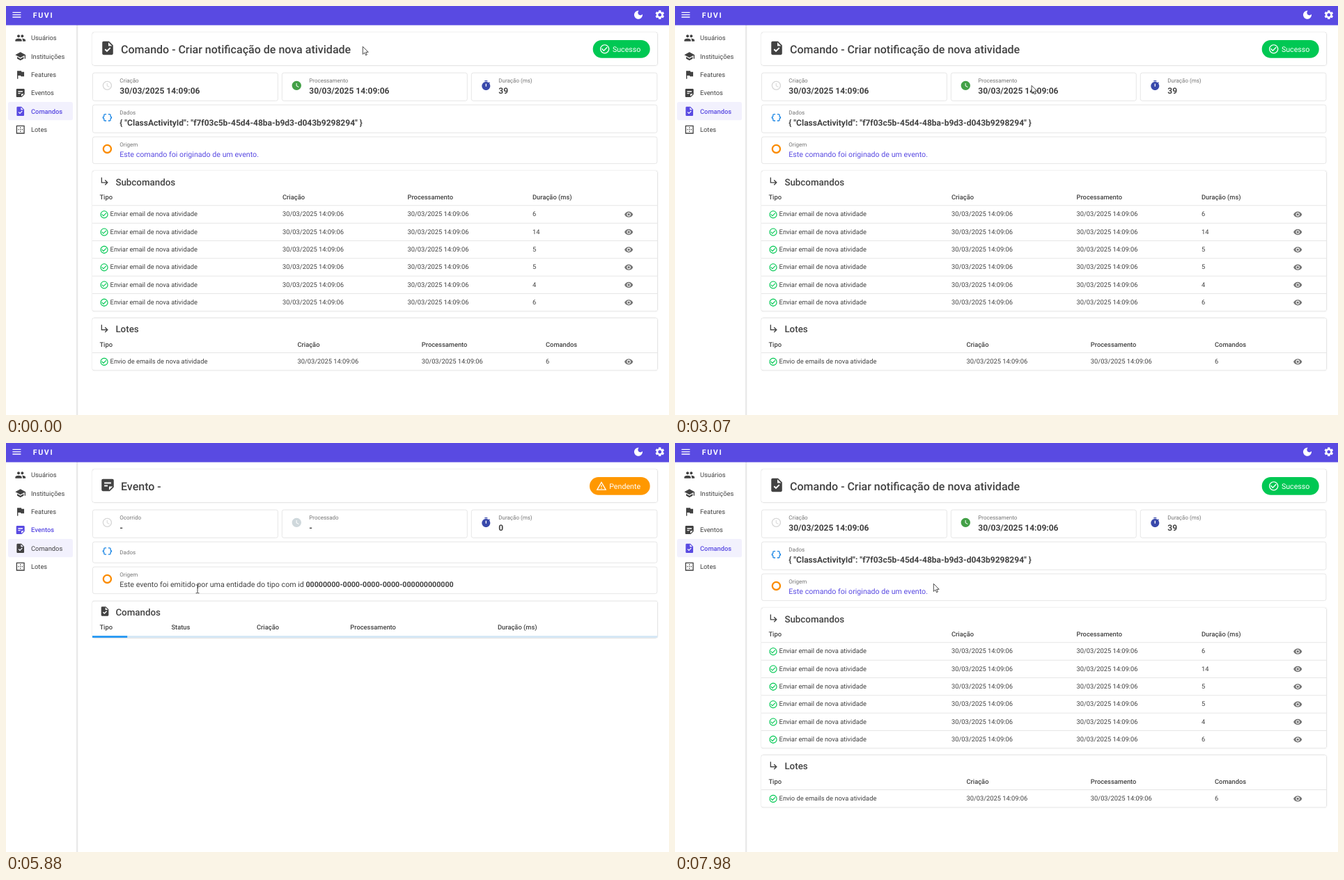
An HTML page that plays this animation: 952 by 588 pixels, repeating every 8000 ms.

```html
<!DOCTYPE html>
<html lang="pt-BR">
<head>
<meta charset="utf-8">
<title>Painel de comandos</title>
<style>
html, body { margin: 0; width: 100%; height: 100%; overflow: hidden; background: #fff; }
svg { display: block; width: 952px; height: 588px; font-family: Roboto, sans-serif; text-rendering: geometricPrecision; }
text { white-space: pre; }
.paper { fill: #fff; filter: drop-shadow(0 .8px .6px rgba(0,0,0,.3)) drop-shadow(0 0 .8px rgba(0,0,0,.14)); }
.card { fill: #fff; stroke: #e0e0e0; stroke-width: .8; }
</style>
</head>
<body>
<svg id="stage" viewBox="0 0 952 588" xmlns="http://www.w3.org/2000/svg"></svg>
<script>
const LOOP = 8000, INK = '#424242', PRIMARY = '#594ae2', GREEN = '#00c853', AMBER = '#ff9800';

const ICONS = {
  menu: 'M3 18h18v-2H3v2zm0-5h18v-2H3v2zm0-7v2h18V6H3z',
  moon: 'M12 3c-4.97 0-9 4.03-9 9s4.03 9 9 9 9-4.03 9-9c0-.46-.04-.92-.1-1.36-.98 1.37-2.58 2.26-4.4 2.26-2.98 0-5.4-2.42-5.4-5.4 0-1.81.89-3.42 2.26-4.4-.44-.06-.9-.1-1.36-.1z',
  gear: 'M19.14 12.94c.04-.3.06-.61.06-.94 0-.32-.02-.64-.07-.94l2.03-1.58c.18-.14.23-.41.12-.61l-1.92-3.32c-.12-.22-.37-.29-.59-.22l-2.39.96c-.5-.38-1.03-.7-1.62-.94l-.36-2.54c-.04-.24-.24-.41-.48-.41h-3.84c-.24 0-.43.17-.47.41l-.36 2.54c-.59.24-1.13.57-1.62.94l-2.39-.96c-.22-.08-.47 0-.59.22L2.74 8.87c-.12.21-.08.47.12.61l2.03 1.58c-.05.3-.09.63-.09.94s.02.64.07.94l-2.03 1.58c-.18.14-.23.41-.12.61l1.92 3.32c.12.22.37.29.59.22l2.39-.96c.5.38 1.03.7 1.62.94l.36 2.54c.05.24.24.41.48.41h3.84c.24 0 .44-.17.47-.41l.36-2.54c.59-.24 1.13-.56 1.62-.94l2.39.96c.22.08.47 0 .59-.22l1.92-3.32c.12-.22.07-.47-.12-.61l-2.01-1.58zM12 15.6c-1.98 0-3.6-1.62-3.6-3.6s1.62-3.6 3.6-3.6 3.6 1.62 3.6 3.6-1.62 3.6-3.6 3.6z',
  people: 'M16 11c1.66 0 2.99-1.34 2.99-3S17.66 5 16 5c-1.66 0-3 1.34-3 3s1.34 3 3 3zm-8 0c1.66 0 2.99-1.34 2.99-3S9.66 5 8 5C6.34 5 5 6.34 5 8s1.34 3 3 3zm0 2c-2.33 0-7 1.17-7 3.5V19h14v-2.5c0-2.33-4.67-3.5-7-3.5zm8 0c-.29 0-.62.02-.97.05 1.16.84 1.97 1.97 1.97 3.45V19h6v-2.5c0-2.33-4.67-3.5-7-3.5z',
  school: 'M5 13.18v4L12 21l7-3.82v-4L12 17l-7-3.82zM12 3 1 9l11 6 9-4.91V17h2V9L12 3z',
  flag: 'M14.4 6 14 4H5v17h2v-7h5.6l.4 2h7V6z',
  note: 'M19 3H4.99C3.89 3 3 3.9 3 5l.01 14c0 1.1.89 2 1.99 2h10l6-6V5c0-1.1-.9-2-2-2zM7 8h10v2H7V8zm5 6H7v-2h5v2zm2 5.5V14h5.5L14 19.5z',
  task: 'M14 2H6c-1.1 0-1.99.9-1.99 2L4 20c0 1.1.89 2 1.99 2H18c1.1 0 2-.9 2-2V8l-6-6zm-3.06 16L7.4 14.46l1.41-1.41 2.12 2.12 4.24-4.24 1.41 1.41L10.94 18zM13 9V3.5L18.5 9H13z',
  batch: 'M13 7h-2v2h2V7zm0 4h-2v2h2v-2zm4 0h-2v2h2v-2zM3 3v18h18V3H3zm16 16H5V5h14v14zm-6-4h-2v2h2v-2zm-4-4H7v2h2v-2z',
  clock: 'M11.99 2C6.47 2 2 6.48 2 12s4.47 10 9.99 10C17.52 22 22 17.52 22 12S17.52 2 11.99 2zM12 20c-4.42 0-8-3.58-8-8s3.58-8 8-8 8 3.58 8 8-3.58 8-8 8zm.5-13H11v6l5.25 3.15.75-1.23-4.5-2.67z',
  clockFull: 'M12 2C6.5 2 2 6.5 2 12s4.5 10 10 10 10-4.5 10-10S17.5 2 12 2zm4.2 14.2L11 13V7h1.5v5.2l4.5 2.7-.8 1.3z',
  timer: 'M15 1H9v2h6V1zm4.03 6.39 1.42-1.42c-.43-.51-.9-.99-1.41-1.41l-1.42 1.42C16.07 4.74 14.12 4 12 4c-4.97 0-9 4.03-9 9s4.02 9 9 9 9-4.03 9-9c0-2.12-.74-4.07-1.97-5.61zM13 14h-2V8h2v6z',
  data: 'M4 7v2c0 .55-.45 1-1 1H2v4h1c.55 0 1 .45 1 1v2c0 1.65 1.35 3 3 3h3v-2H7c-.55 0-1-.45-1-1v-2c0-1.3-.84-2.42-2-2.83v-.34C5.16 11.42 6 10.3 6 9V7c0-.55.45-1 1-1h3V4H7C5.35 4 4 5.35 4 7zm17 3c-.55 0-1-.45-1-1V7c0-1.65-1.35-3-3-3h-3v2h3c.55 0 1 .45 1 1v2c0 1.3.84 2.42 2 2.83v.34c-1.16.41-2 1.52-2 2.83v2c0 .55-.45 1-1 1h-3v2h3c1.65 0 3-1.35 3-3v-2c0-.55.45-1 1-1h1v-4h-1z',
  branch: 'm19 15-6 6-1.42-1.42L15.17 16H4V4h2v10h9.17l-3.59-3.58L13 9l6 6z',
  check: 'M16.59 7.58 10 14.17l-3.59-3.58L5 12l5 5 8-8zM12 2C6.48 2 2 6.48 2 12s4.48 10 10 10 10-4.48 10-10S17.52 2 12 2zm0 18c-4.42 0-8-3.58-8-8s3.58-8 8-8 8 3.58 8 8-3.58 8-8 8z',
  warn: 'M12 5.99 19.53 19H4.47L12 5.99M12 2 1 21h22L12 2zm1 14h-2v2h2v-2zm0-6h-2v4h2v-4z',
  eye: 'M12 4.5C7 4.5 2.73 7.61 1 12c1.73 4.39 6 7.5 11 7.5s9.27-3.11 11-7.5c-1.73-4.39-6-7.5-11-7.5zM12 17c-2.76 0-5-2.24-5-5s2.24-5 5-5 5 2.24 5 5-2.24 5-5 5zm0-8c-1.66 0-3 1.34-3 3s1.34 3 3 3 3-1.34 3-3-1.34-3-3-3z'
};

// Markup helpers; icons and texts are placed by their vertical centre.
const icon = (name, x, y, fill = INK, size = 16) =>
  `<path d="${ICONS[name]}" fill="${fill}" transform="translate(${x - size / 2} ${y - size / 2}) scale(${size / 24})"/>`;
const text = (x, y, str, size = 9.333, weight = 400, fill = INK, extra = '') =>
  `<text x="${x}" y="${y + size * .355}" font-size="${size}" font-weight="${weight}" fill="${fill}" ${extra}>${str}</text>`;
const rect = (x, y, w, h, attrs) => `<rect x="${x}" y="${y}" width="${w}" height="${h}" ${attrs}/>`;
const paper = (y, bottom) => rect(124, y, 811.3, bottom - y, 'rx="2.7" class="paper"');
const card = (x, y, w, h) => rect(x + .4, y + .4, w - .8, h - .8, 'rx="2.7" class="card"');
const rule = y => rect(124, y, 811.3, .7, 'fill="#dcdcdc"');

const ID = 'f7f03c5b-45d4-48ba-b9d3-d043b9298294';
const STAMP = '30/03/2025 14:09:06';

function chip(done) {
  const x = done ? 842.7 : 838, color = done ? GREEN : AMBER;
  return rect(x, 49, 924.7 - x, 25.7, `rx="12.8" fill="${color}"`) +
    icon(done ? 'check' : 'warn', x + 17, 61.8, '#fff') +
    text(x + 28.2, 62, done ? 'Sucesso' : 'Pendente', 10.667, 400, '#fff');
}

function overview({ symbol, title, labels, ms, origin, done }) {
  const shift = done ? 0 : -10;
  const stamp = done ? STAMP : '-';
  const fact = (x, label, value) => text(x, 107, label, 8, 400, '#757575') + text(x, 122, value, 12, 700);
  return paper(38, 85.3) + icon(symbol, 146, 60.5, INK, 23.33) + text(165, 62.7, title, 16, 500) + chip(done) +
    card(124, 95.7, 266.8, 41) + card(395.9, 95.7, 266.8, 41) + card(667.9, 95.7, 267.4, 41) +
    icon('clock', 145.4, 114.3, '#d6d6d6') + icon('clockFull', 417.3, 114.3, done ? '#43a047' : '#cfd8dc') +
    icon('timer', 689.3, 114.3, '#3949ab') +
    fact(163.3, labels[0], stamp) + fact(435.3, labels[1], stamp) + fact(707.3, 'Duração (ms)', ms) +
    card(124, 141.7, 811.3, 41 + shift) + icon('data', 145.4, done ? 160.3 : 155.5, '#1e88e5') +
    text(163.3, done ? 153.3 : 157, 'Dados', 8, 400, '#757575') +
    (done ? text(163.3, 168, `{ "ClassActivityId": "${ID}" }`, 12, 700) : '') +
    card(124, 187.7 + shift, 811.3, 39.3) +
    `<circle cx="145.4" cy="${205.4 + shift}" r="5.6" fill="none" stroke="#fb8c00" stroke-width="2.3"/>` +
    text(163.3, 199.3 + shift, 'Origem', 8, 400, '#757575') + origin(213.3 + shift);
}

function table(y, symbol, title, xs, heads, rows, loading) {
  const bottom = loading ? y + 53 : y + 49.7 + rows.length * 25.33;
  let out = paper(y, bottom) + icon(symbol, 142, y + 14.8) + text(157.4, y + 15.8, title, 13.333, 500);
  heads.forEach((h, i) => out += text(xs[i], y + 37.8, h, 9.333, 500));
  rows.forEach((row, i) => {
    const top = y + 49.5 + i * 25.33;
    out += rect(124, top, 811.3, 25.3, 'class="row" fill="#f5f5f5" visibility="hidden"') + rule(top) + row(top + 12.6);
  });
  if (loading) out += rect(124, y + 50, 811.3, 2.7, 'fill="#d3e6f5"') +
    rect(124, y + 50, 0, 2.7, 'class="bar" fill="#2196f3"');
  return out;
}

const sideRow = (label, xs, n) => y =>
  icon('check', 141, y + .6, GREEN, 13.33) + text(149.6, y, label) +
  text(xs[1], y, STAMP) + text(xs[2], y, STAMP) + text(xs[3], y, n) + icon('eye', 894.2, y + .6, '#757575', 13.33);

function commandPage(done) {
  const subX = [134.4, 397, 576.5, 756], lotX = [134.4, 418.4, 596.8, 775];
  const gap = done ? 0 : -10;
  const counts = done ? [6, 14, 5, 5, 4, 6] : [];
  return overview({
    symbol: 'task', title: done ? 'Comando - Criar notificação de nova atividade' : 'Comando -',
    labels: ['Criação', 'Processamento'], ms: done ? 39 : 0, done,
    origin: y => done ? text(163.3, y, 'Este comando foi originado de um evento.', 10.667, 400, PRIMARY, 'class="link"') : text(163.3, y, '-', 10.667)
  }) +
  table(237 + gap, 'branch', 'Subcomandos', subX, ['Tipo', 'Criação', 'Processamento', 'Duração (ms)'],
    counts.map(n => sideRow('Enviar email de nova atividade', subX, n)), !done) +
  table(done ? 448.7 : 291, 'branch', 'Lotes', lotX, ['Tipo', 'Criação', 'Processamento', 'Comandos'],
    done ? [sideRow('Envio de emails de nova atividade', lotX, 6)] : [], !done);
}

function eventPage(done) {
  const xs = done ? [134.4, 362.7, 476, 629.5, 783.2] : [134.4, 237.4, 360, 494.3, 706];
  const bold = s => `<tspan font-weight="700">${s}</tspan>`;
  const row = y => text(xs[0], y, 'Criar notificação de nova atividade') +
    rect(362.9, y - 7.4, 57.6, 15.4, 'rx="7.7" fill="#00c853"') + icon('check', 374.2, y + .4, '#fff', 12) +
    text(382.3, y + .5, 'Sucesso', 8, 400, '#fff') +
    text(xs[2], y, STAMP) + text(xs[3], y, STAMP) + text(xs[4], y, 39) + icon('eye', 902.5, y + .6, '#757575', 13.33);
  return overview({
    symbol: 'note', title: done ? 'Evento - Atividade criada' : 'Evento -',
    labels: ['Ocorrido', 'Processado'], ms: done ? 2 : 0, done,
    origin: y => text(163.3, y, 'Este evento foi emitido por uma entidade do tipo ' +
      (done ? bold('ClassActivity') + ' ' : '') + 'com id ' + bold(done ? ID : ID.replace(/[^-]/g, '0')), 10.667)
  }) +
  table(done ? 237 : 227.2, 'task', 'Comandos', xs, ['Tipo', 'Status', 'Criação', 'Processamento', 'Duração (ms)'],
    done ? [row] : [], !done);
}

const NAV = [['people', 'Usuários'], ['school', 'Instituições'], ['flag', 'Features'],
  ['note', 'Eventos'], ['task', 'Comandos'], ['batch', 'Lotes']];

const navItem = ([name, label], i) => {
  const y = 46 + i * 26.33;
  return `<g class="nav">` + rect(3, y - 13.2, 93, 26.2, 'rx="2.7" fill="#594ae2" fill-opacity="0"') +
    icon(name, 20.7, y, 'currentColor') + text(36, y, label, 9.333, 400, 'currentColor') + '</g>';
};

const stage = document.getElementById('stage');
stage.innerHTML =
  `<defs><linearGradient id="edge"><stop stop-color="#000" stop-opacity=".15"/><stop offset="1" stop-color="#000" stop-opacity="0"/></linearGradient></defs>` +
  rect(0, 0, 952, 588, 'fill="#fff"') + rect(101.4, 27, 2.6, 561, 'fill="url(#edge)"') +
  NAV.map(navItem).join('') +
  rect(0, 0, 952, 27.6, `fill="${PRIMARY}"`) + icon('menu', 15.4, 12.7, '#fff') +
  text(38.8, 12.8, 'FUVI', 10.667, 700, '#fff', 'letter-spacing="1.6"') +
  icon('moon', 908, 12.7, '#fff') + icon('gear', 938.8, 12.7, '#fff') +
  [commandPage(true), eventPage(false), eventPage(true), commandPage(false)].map(s => `<g class="page">${s}</g>`).join('') +
  `<circle id="click" r="8.2" fill="#f3e81c" fill-opacity=".75"/>
  <g id="pointer">
    <path d="M.3.3V11.4L2.9 9l1.7 3.8 1.8-.8-1.7-3.7h3.5z" fill="#fff" stroke="#222" stroke-width=".8"/>
    <path d="M-2.4-5.8H-.6L0-5.2.6-5.8H2.4M0-5.2V5.4M-2.4 6H-.6L0 5.4.6 6H2.4" fill="none" stroke="#333" stroke-width=".9"/>
    <path d="M-1.2.7Q0-.7 1.1.7V5.2Q2.2 4.4 3.1 5.5 4.2 4.8 5 6 6.6 5.6 6.9 7.2V10.6Q6.7 12.6 5.6 13.4V15H-.3V13.6L-3.6 9.4Q-4.2 7.8-2.6 7.8L-1.2 9.1z" fill="#fff" stroke="#222" stroke-width=".9" stroke-linejoin="round"/>
  </g>`;

const all = s => [...stage.querySelectorAll(s)];
const pages = all('.page'), navs = all('.nav'), rows = [...pages[2].querySelectorAll('.row')];
const link = stage.querySelector('.link');
const click = document.getElementById('click'), pointer = document.getElementById('pointer');
const eventBars = [...pages[1].querySelectorAll('.bar')], commandBars = [...pages[3].querySelectorAll('.bar')];

// Page switches and clicks, in ms.
const OPEN_EVENT = 5870, EVENT_READY = 6060, OPEN_COMMAND = 7470, COMMAND_READY = 7640;

const PATH = [
  [0, 512, 58], [40, 512, 58], [170, 526, 58], [540, 160, 61], [820, 232, 61], [1200, 520, 62],
  [1500, 846, 74], [1620, 878, 70], [1720, 885, 58], [1880, 823, 63], [2320, 168, 108], [2480, 188, 105],
  [2760, 300, 112], [3070, 511, 114], [3210, 628, 134], [3300, 606, 128], [3620, 868, 112], [3800, 820, 122],
  [4120, 493, 150], [4500, 147, 151], [4960, 475, 154], [5230, 340, 184], [5470, 275, 209.8],
  [6120, 275, 209.8], [6380, 320, 220], [6560, 240, 228], [6740, 150, 289], [7190, 903.5, 300],
  [7560, 903.5, 300], [7980, 371, 202], [8000, 371, 202]
];

// Smooth curve through the keys; tangents vanish at turning points.
function pointAt(t) {
  let i = 0;
  while (i < PATH.length - 2 && t >= PATH[i + 1][0]) i++;
  const a = PATH[i], b = PATH[i + 1], span = b[0] - a[0], u = (t - a[0]) / span;
  const slope = (k, c) => {
    if (k < 1 || k > PATH.length - 2) return 0;
    const [p, q, r] = [PATH[k - 1], PATH[k], PATH[k + 1]];
    const l = (q[c] - p[c]) / (q[0] - p[0]), m = (r[c] - q[c]) / (r[0] - q[0]);
    return l * m > 0 ? 2 * l * m / (l + m) : 0;
  };
  return [1, 2].map(c => {
    const h = u * u * (3 - 2 * u), v = u * (1 - u);
    return a[c] + (b[c] - a[c]) * h + span * v * ((1 - u) * slope(i, c) - u * slope(i + 1, c));
  });
}

const inside = (x, y, [l, t, r, b]) => x >= l && x <= r && y >= t && y <= b;
const TEXTS = [
  [[164, 51, 490, 74], [163, 115, 278, 130], [435, 115, 550, 130]],
  [[163, 196, 640, 211]],
  [[163, 206, 700, 221], [134, 293, 278, 306]],
  []
];
const LINKS = [[[163, 206, 362, 221]], [], [[895, 293, 910, 307]], []];

const clamp = v => Math.max(0, Math.min(1, v));
const show = (el, on) => el.setAttribute('visibility', on ? 'visible' : 'hidden');

function moveBars(bars, t, start) {
  const q = (t - start) / 1260;
  const left = clamp(-.35 + 1.35 * q), right = clamp(1.9 * q);
  bars.forEach(bar => {
    bar.setAttribute('x', 124 + 811.3 * left);
    bar.setAttribute('width', 811.3 * Math.max(0, right - left));
  });
}

function render(t) {
  const page = t < OPEN_EVENT || t >= COMMAND_READY ? 0 : t < EVENT_READY ? 1 : t < OPEN_COMMAND ? 2 : 3;
  pages.forEach((p, i) => p.style.display = i === page ? '' : 'none');

  const onEvent = page === 1 || page === 2;
  const fade = clamp((t - OPEN_EVENT - 10) / 250) - clamp((t - OPEN_COMMAND) / 250);
  navs.forEach((nav, i) => {
    const active = i === (onEvent ? 3 : 4);
    nav.setAttribute('color', active ? PRIMARY : INK);
    nav.lastChild.setAttribute('font-weight', active ? 500 : 400);
    nav.firstChild.setAttribute('fill-opacity', .075 * (i === 3 ? fade : i === 4 ? 1 - fade : 0));
  });
  moveBars(eventBars, t, 5840);
  moveBars(commandBars, t, 7440);

  const [x, y] = pointAt(t);
  const onLink = LINKS[page].some(z => inside(x, y, z));
  const shape = onLink ? 2 : TEXTS[page].some(z => inside(x, y, z)) ? 1 : 0;
  pointer.setAttribute('transform', `translate(${x} ${y})`);
  [...pointer.children].forEach((el, i) => show(el, i === shape));
  link.setAttribute('text-decoration', onLink ? 'underline' : 'none');
  rows.forEach(row => row.setAttribute('visibility', inside(x, y, [124, 286.5, 935, 312]) ? 'inherit' : 'hidden'));

  click.setAttribute('cx', x - .8);
  click.setAttribute('cy', y - .4);
  show(click, (t >= 5790 && t < OPEN_EVENT) || (t >= 7390 && t < OPEN_COMMAND));
}

const begin = performance.now();
function tick() {
  render((performance.now() - begin) % LOOP);
  requestAnimationFrame(tick);
}
tick();
</script>
</body>
</html>
```
